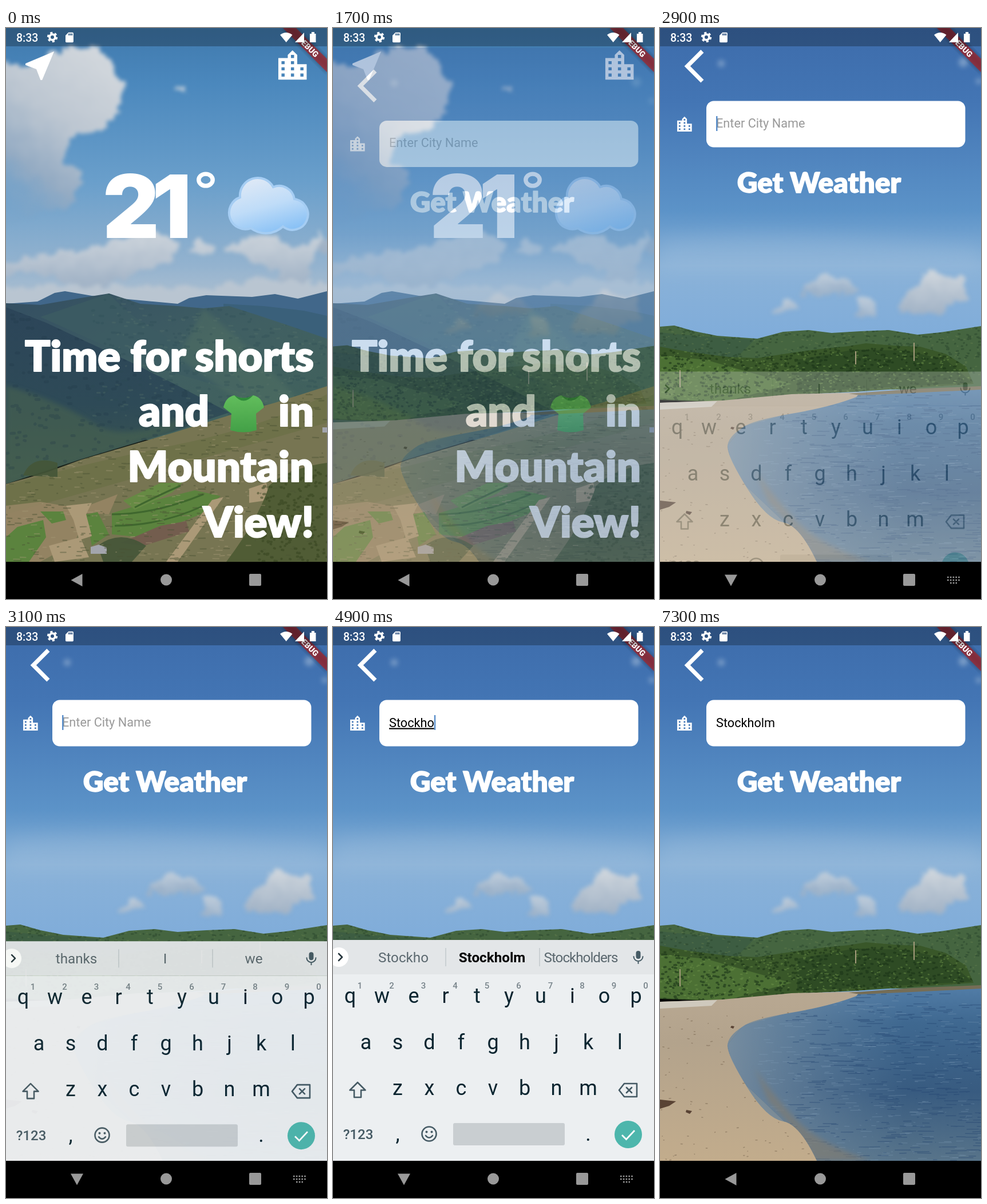
An HTML page that plays this animation: 561 by 998 pixels, repeating every 8 s.

```html
<!DOCTYPE html>
<html lang="en">
<head>
<meta charset="utf-8">
<title>Weather app</title>
<style>
  html, body { margin: 0; width: 100%; height: 100%; overflow: hidden; background: #000; }
  svg { display: block; width: 100vw; height: 100vh; font-family: Roboto, sans-serif; }
  .head { font-family: Lato, sans-serif; font-weight: 900; fill: #fff; stroke: #fff; stroke-width: 1.4; stroke-linejoin: round; }
  .big { font-size: 74px; text-anchor: end; stroke-width: 2; }
  .temp { font: 900 153px Inter, sans-serif; letter-spacing: -13px; fill: #fff; }
  .field { font-size: 21.7px; }
  .key { font-size: 36px; fill: #0b2530; text-anchor: middle; }
  .num { font-size: 15px; font-weight: 500; fill: #77838a; text-anchor: middle; }
  .word { font-size: 24.2px; fill: #5b686f; text-anchor: middle; }
  .word.bold { font-weight: 700; fill: #000; }
  .line { fill: none; stroke: #455a64; stroke-width: 2.6; stroke-linejoin: round; stroke-linecap: round; }
</style>
</head>
<body>
<svg viewBox="0 0 561 998" preserveAspectRatio="none">
  <defs>
    <linearGradient id="skyA" x2="0" y2="1">
      <stop offset="0" stop-color="#3f79ad"/><stop offset=".2" stop-color="#4b88bd"/>
      <stop offset=".55" stop-color="#6a9fcb"/><stop offset=".85" stop-color="#94b3cf"/>
      <stop offset="1" stop-color="#b4c3d1"/>
    </linearGradient>
    <linearGradient id="skyB" x2="0" y2="1">
      <stop offset="0" stop-color="#3d6cab"/><stop offset=".2" stop-color="#4375b4"/>
      <stop offset=".5" stop-color="#5c93c8"/><stop offset=".65" stop-color="#8ab2d8"/>
      <stop offset="1" stop-color="#78a8db"/>
    </linearGradient>
    <linearGradient id="bank" x1=".8" x2=".3" y2="1">
      <stop offset="0" stop-color="#d3d8dd"/><stop offset=".45" stop-color="#bcc6d1"/>
      <stop offset=".75" stop-color="#94abc3"/><stop offset="1" stop-color="#7ba3c7" stop-opacity=".3"/>
    </linearGradient>
    <linearGradient id="heap" x2="0" y2="1">
      <stop offset="0" stop-color="#ced5dc"/><stop offset="1" stop-color="#9fb1c5"/>
    </linearGradient>
    <linearGradient id="range" x2="1" y2="1">
      <stop offset="0" stop-color="#334e62"/><stop offset=".5" stop-color="#405f62"/>
      <stop offset="1" stop-color="#41625a"/>
    </linearGradient>
    <linearGradient id="shade" x2="0" y2="1">
      <stop offset="0" stop-color="#2c4559"/><stop offset=".55" stop-color="#2e4a57"/>
      <stop offset="1" stop-color="#3e584f"/>
    </linearGradient>
    <linearGradient id="sea" x2="0" y2="1">
      <stop offset="0" stop-color="#517ca6"/><stop offset=".2" stop-color="#3f6890"/>
      <stop offset=".6" stop-color="#385b80"/><stop offset="1" stop-color="#58748a"/>
    </linearGradient>
    <linearGradient id="shallow">
      <stop offset="0" stop-color="#8496a4" stop-opacity=".8"/><stop offset=".7" stop-color="#6d8ba6" stop-opacity="0"/>
    </linearGradient>
    <linearGradient id="sand" x2="0" y2="1">
      <stop offset="0" stop-color="#b8a892"/><stop offset=".3" stop-color="#b3a38c"/>
      <stop offset="1" stop-color="#c2ac8c"/>
    </linearGradient>
    <linearGradient id="puff" x1=".3" x2=".7" y2="1">
      <stop offset="0" stop-color="#dfe9f6"/><stop offset=".5" stop-color="#bfdcf8"/>
      <stop offset="1" stop-color="#85bff5"/>
    </linearGradient>
    <linearGradient id="cloth" x2="0" y2="1">
      <stop offset="0" stop-color="#62bd5c"/><stop offset="1" stop-color="#43a047"/>
    </linearGradient>
    <filter id="fluff" x="-20%" y="-20%" width="140%" height="140%" color-interpolation-filters="sRGB">
      <feTurbulence type="fractalNoise" baseFrequency=".045" numOctaves="3" seed="4"/>
      <feDisplacementMap in="SourceGraphic" scale="26" xChannelSelector="R" yChannelSelector="G"/>
      <feGaussianBlur stdDeviation="3.5"/>
    </filter>
    <filter id="soft" x="-20%" y="-30%" width="140%" height="160%"><feGaussianBlur stdDeviation="4"/></filter>
    <filter id="haze" x="-20%" y="-60%" width="140%" height="220%"><feGaussianBlur stdDeviation="16"/></filter>
    <clipPath id="app"><path d="M0 0H561V933H0z"/></clipPath>
    <clipPath id="cRange"><path id="pRange" d="M0 481L60 484 130 472 180 464 235 482 300 486 345 490 390 486 440 502 500 522 561 543V720H0z"/></clipPath>
    <clipPath id="cShade"><path id="pShade" d="M0 488L70 515 140 548 220 585 300 625 390 672 290 706 130 754 0 797z"/></clipPath>
    <clipPath id="cHill"><path id="pHill" d="M0 797L70 777 130 755 290 708 390 677 470 655 561 626V933H0z"/></clipPath>
    <clipPath id="cWood"><path id="pWood" d="M0 557L50 566 120 575 170 577 215 570 280 561 330 556 360 551 420 556 455 557 500 570 535 592 548 622 340 636 230 641 110 654 0 650z"/></clipPath>
    <clipPath id="cRidge"><path id="pRidge" d="M0 522L25 520 60 530 100 538 170 543 215 531 260 528 300 533 350 530 400 528 450 536 490 532 561 521V632H0z"/></clipPath>
    <clipPath id="cSea"><path id="pSea" d="M561 631L440 636 345 641 225 674 145 697 118 730 126 765 152 802 215 862 275 933H561z"/></clipPath>
    <clipPath id="cSand"><path id="pSand" d="M0 655L110 651 230 640 350 637 343 645Q300 662 230 674T145 698Q118 715 118 732T152 804 215 864 274 933H0z"/></clipPath>
    <path id="city" d="M15 11V5l-3-3-3 3v2H3v14h18V11h-6zm-8 8H5v-2h2v2zm0-4H5v-2h2v2zm0-4H5V9h2v2zm6 8h-2v-2h2v2zm0-4h-2v-2h2v2zm0-4h-2V9h2v2zm0-4h-2V5h2v2zm6 12h-2v-2h2v2zm0-4h-2v-2h2v2z" fill="#fff"/>
  </defs>

  <g clip-path="url(#app)">
    <g id="weather">
      <path d="M0 0H561V490H0z" fill="url(#skyA)"/>
      <g filter="url(#fluff)">
        <path d="M-20 62L40 66 90 40 130 30 160 36 185 70 203 100 198 150 165 178 115 190 98 235 140 250 110 315 60 325 -20 345z" fill="url(#bank)"/>
        <g fill="url(#heap)">
          <path d="M-20 415Q60 395 130 385T230 362 290 370 285 405 200 442 90 440 -20 440z"/>
          <path d="M320 392Q340 345 362 392zM385 385Q440 350 480 372T540 365 535 410 470 424z"/>
          <path d="M545 365H590V395H545zM295 103L322 101 312 113z"/>
        </g>
        <path d="M-20 455Q100 448 200 452T330 458L440 438 590 448V500H-20z" fill="#b9c5d1"/>
      </g>
      <path d="M0 482L55 478 85 463 103 460 150 468 300 482 320 472 350 467 430 470 470 465 510 473 561 460V560H0z" fill="#41678a"/>
      <path d="M380 482L450 486 520 494 561 503V570H380z" fill="#3a607a"/>
      <use href="#pRange" fill="url(#range)"/>
      <path d="M180 464Q230 520 320 560T420 640L250 590 60 505z" fill="#3c5c62" opacity=".8"/>
      <path d="M345 490Q320 540 300 575L420 660H520Q440 570 345 490z" fill="#527264" opacity=".45" filter="url(#soft)"/>
      <use href="#pShade" fill="url(#shade)"/>
      <path d="M0 625Q90 650 150 690T330 670L290 705 0 797z" fill="#48644f" opacity=".6" filter="url(#soft)"/>
      <g id="slopes"></g>
      <use href="#pHill" fill="#777552"/>
      <path d="M0 800Q120 765 290 730T561 640V690Q420 730 300 765T0 850z" fill="#6c7047" opacity=".7"/>
      <path d="M0 835L60 828 130 840 195 815 180 850 140 848 120 900 60 933H0z" fill="#9a8867" opacity=".8"/>
      <path d="M20 872L65 860 70 890 40 933H0V890zM60 845L100 845 105 860 80 866zM140 850L160 846 180 885 150 905zM185 848L250 828 330 808 375 818 340 850 300 866 235 890 185 885z" fill="#5b833e"/>
      <path d="M205 826L270 795 308 795 290 812 225 842z" fill="#668a44"/>
      <path d="M105 835L150 830 140 850 150 888 128 895 118 860zM75 905L130 890 145 925 85 933zM425 805L455 795 460 825 425 830zM360 825L380 820 300 933H280z" fill="#ab9977"/>
      <path d="M270 870L315 862 320 880 240 905 200 900z" fill="#735d4e"/>
      <path d="M185 850Q260 850 345 815M190 870Q270 870 345 835M225 838Q270 815 305 800" fill="none" stroke="#3f672e" stroke-width="3"/>
      <path d="M460 800Q490 770 561 760V933H385Q440 860 460 800z" fill="#505c35"/>
      <path d="M30 782Q45 745 90 760V785zM160 905Q200 875 245 905L220 933H170z" fill="#445638" opacity=".9"/>
      <path d="M148 907l14-4 14 5v11h-28zM553 698h12v9h-12z" fill="#a3a5ad"/>
      <g id="fields"></g>

      <path transform="translate(25.7 32.7) scale(2.78)" d="M21 3L3 10.53v.98l6.84 2.65L12.48 21h.98L21 3z" fill="#fff"/>
      <use href="#city" transform="translate(467.7 33.6) scale(2.75 2.7)"/>
      <text class="temp" x="169" y="367">21</text>
      <ellipse cx="349" cy="265.5" rx="12.2" ry="10.4" fill="none" stroke="#fff" stroke-width="7.4"/>
      <path d="M428 350A26 26 0 0 1 409 296A31 31 0 0 1 467 278A27 27 0 0 1 504 299A27 27 0 1 1 484 347A44 44 0 0 1 428 350z" fill="url(#puff)" stroke="#a5cdf3" stroke-width="4"/>
      <g class="head big">
        <text x="538" y="600">Time for shorts</text>
        <text x="355" y="696">and</text>
        <text x="538" y="696">in</text>
        <text x="538" y="793">Mountain</text>
        <text x="538" y="890">View!</text>
      </g>
      <path d="M399 642Q415 652 432 642Q447 645 451 663L437 674 438 703Q415 710 392 703L394 674 380 663Q384 645 399 642z" fill="url(#cloth)"/>
      <path d="M399 642Q415 661 432 642Q415 651 399 642z" fill="#2f8a3a"/>
    </g>

    <g id="search">
      <path d="M0 0H561V640H0z" fill="url(#skyB)"/>
      <path d="M0 372Q200 350 561 385V425H0z" fill="#a5c2de" opacity=".3" filter="url(#haze)"/>
      <g filter="url(#fluff)" fill="url(#heap)">
        <path d="M245 466L265 442 295 430 325 440 352 455 350 466z" opacity=".8"/>
        <path d="M415 500L428 470 450 452 455 425 478 424 500 436 525 434 540 455 535 475 505 485 490 503z"/>
        <path d="M195 496L222 470 248 495zM342 506L348 472 368 470 382 502z" opacity=".8"/>
      </g>
      <g fill="#a3bbd8" opacity=".6" filter="url(#soft)"><circle cx="107" cy="62" r="6"/><circle cx="530" cy="60" r="8"/><circle cx="557" cy="93" r="5"/></g>
      <use href="#pRidge" fill="#456540"/>
      <path d="M0 532L60 538 165 545 120 590H0z" fill="#3b5a43" opacity=".7"/>
      <g id="ridge"></g>
      <use href="#pWood" fill="#395729"/>
      <path d="M0 572L80 580 150 600 230 622 110 654 0 648z" fill="#4c7034"/>
      <path d="M240 580L340 562 430 564 500 580 545 620 240 636z" fill="#2b4723" opacity=".75"/>
      <g id="wood"></g>
      <path d="M342 588V565M444 582V550M35 628V598" stroke="#a49b7b" stroke-width="2"/>
      <path d="M0 660L350 640 561 631V933H0z" fill="#7b8c98"/>
      <use href="#pSea" fill="url(#sea)"/>
      <use href="#pSea" fill="url(#shallow)"/>
      <g id="waves"></g>
      <path d="M165 770Q190 810 235 858T370 933H272Q240 880 190 830z" fill="#7f7c72" opacity=".7" filter="url(#soft)"/>
      <use href="#pSand" fill="url(#sand)"/>
      <path d="M330 639L440 631 561 626V632L440 638 350 642z" fill="#756d56"/>
      <path d="M0 655L100 652 90 662 0 667z" fill="#cfc9bd"/>
      <g id="shore"></g>
      <path d="M0 826l28 3-12 8-16 5zM46 844l10 2-4 5-7-3zM125 697l5 1-2 4-5-2z" fill="#594334"/>

      <path transform="translate(42.6 32) scale(2.9)" d="M11.67 3.87L9.9 2.1 0 12l9.9 9.9 1.77-1.77L3.54 12z" fill="#fff"/>
      <use href="#city" transform="translate(25.8 152) scale(1.42 1.38)"/>
      <rect x="81" y="127.5" width="452.5" height="81" rx="13" fill="#fff"/>
      <text class="field" id="hint" x="98" y="174" fill="#999">Enter City Name</text>
      <text class="field" id="typed" x="98" y="174.5"></text>
      <rect id="caret" y="154" width="2.5" height="26" fill="#5b8fca"/>
      <text class="head" x="278" y="288" font-size="49.5" text-anchor="middle">Get Weather</text>
    </g>

    <g id="keyboard">
      <path d="M0 547H561V607H0z" fill="#e3e6e8"/>
      <path d="M0 607H561V933H0z" fill="#eceff1"/>
      <circle cx="10" cy="577" r="17" fill="#fff"/>
      <path class="line" d="M10 571l6 6-6 6" style="stroke:#26363d"/>
      <path d="M197 561V593M361 561V593" stroke="#c2c9cc" stroke-width="1.5"/>
      <g id="words"></g>
      <rect x="529.5" y="566" width="8" height="14" rx="4" fill="#455a64"/>
      <path class="line" d="M525.5 576a8 8 0 0 0 16 0M533.5 584v4" style="stroke-width:2"/>
      <g id="keys"></g>
      <path class="line" d="M43 796l-13.5 13.5h7.5V822h12V809.5h7.5z"/>
      <path class="line" d="M509 798H531V821H509L500 809.5zM513 805l9 9m0-9l-9 9"/>
      <text x="44" y="895" font-size="24" font-weight="500" text-anchor="middle" fill="#455a64">?123</text>
      <circle class="line" cx="168" cy="886" r="12.5"/>
      <path class="line" d="M162 889q6 7 12 0"/>
      <circle cx="163.5" cy="882.5" r="2" fill="#455a64"/><circle cx="172.5" cy="882.5" r="2" fill="#455a64"/>
      <rect x="210" y="867" width="195" height="39" rx="3" fill="#c9ced1"/>
      <circle id="done" cx="516" cy="887" r="24"/>
      <path d="M505 888l7.5 7.5L527 880" fill="none" stroke="#fff" stroke-width="2.8"/>
    </g>
  </g>

  <g transform="translate(561 0) rotate(45)">
    <rect x="-55" y="38.2" width="110" height="16.4" fill="#000" opacity=".35" filter="url(#soft)"/>
    <rect x="-55" y="38.2" width="110" height="16.4" fill="#b71c1c" opacity=".63"/>
    <text y="51.3" font-size="13.9" font-weight="900" text-anchor="middle" fill="#fff">DEBUG</text>
  </g>
  <path d="M0 0H561V32H0z" opacity=".26"/>
  <g fill="#fff">
    <text x="18" y="23.5" font-size="19.5" font-weight="500">8:33</text>
    <g fill="none" stroke="#fff">
      <circle cx="81" cy="16" r="4.9" stroke-width="3.8"/>
      <circle cx="81" cy="16" r="7.6" stroke-width="3.2" stroke-dasharray="4 3.96"/>
    </g>
    <path transform="translate(100.5 6) scale(.87)" d="M18 2h-8L4.02 8 4 20c0 1.1.9 2 2 2h12c1.1 0 2-.9 2-2V4c0-1.1-.9-2-2-2zm-6 6h-2V4h2v4zm3 0h-2V4h2v4zm3 0h-2V4h2v4z"/>
    <path d="M479 12Q489.500 4 500.500 12L489.700 25zM505 25L521 8V25zM531 10h3V7h5v3h2.500V25H531z"/>
  </g>

  <path d="M0 933H561V998H0z"/>
  <g fill="#999">
    <path id="back" d="M113.5 965L133.5 954V976z"/>
    <circle cx="280" cy="964.5" r="10"/>
    <rect x="425" y="954" width="21" height="21" rx="2"/>
    <path id="ime" d="M502 960H524M502 965H524M507 970H519" stroke="#999" stroke-width="2.6" stroke-dasharray="2.6 2.2"/>
  </g>
  <circle id="tap" r="14" fill="#b4d2e6" fill-opacity=".55" stroke="#8fb4cc" stroke-opacity=".5"/>
</svg>

<script>
const LOOP = 8000, TICK = 100;
const $ = id => document.getElementById(id);
const clamp = v => Math.min(1, Math.max(0, v));
const add = (parent, tag, attrs, text = '') => {
  const el = document.createElementNS('http://www.w3.org/2000/svg', tag);
  for (const k in attrs) el.setAttribute(k, attrs[k]);
  el.textContent = text;
  return parent.appendChild(el);
};

// Photo texture: seeded dabs inside a clipped area
let seed = 7;
const rnd = () => (seed = seed * 16807 % 2147483647) / 2147483647;
function dabs(layer, clip, [x, y, w, h], n, color, size, len, opacity) {
  let d = '';
  for (let i = 0; i < n; i++) {
    d += `M${(x + rnd() * w).toFixed(1)} ${(y + rnd() * h).toFixed(1)}l${(.1 + rnd() * len).toFixed(1)} ${(rnd() - .5).toFixed(1)}`;
  }
  const g = add($(layer), 'g', { 'clip-path': `url(#${clip})` });
  add(g, 'path', { d, fill: 'none', stroke: color, 'stroke-width': size, 'stroke-linecap': 'round', opacity });
}
dabs('slopes', 'cRange', [150, 465, 411, 220], 300, '#2b474f', 4, 8, .25);
dabs('slopes', 'cRange', [150, 465, 411, 220], 200, '#5d7a6c', 3, 6, .25);
dabs('slopes', 'cShade', [0, 490, 390, 300], 300, '#1f3646', 5, 6, .25);
dabs('fields', 'cHill', [0, 640, 561, 293], 450, '#4b5233', 2.2, 12, .45);
dabs('fields', 'cHill', [0, 660, 450, 273], 260, '#a89c78', 1.8, 12, .4);
dabs('fields', 'cHill', [440, 770, 121, 163], 200, '#35431f', 4, 3, .5);
dabs('ridge', 'cRidge', [0, 520, 561, 90], 500, '#2b472d', 3, 3, .5);
dabs('ridge', 'cRidge', [0, 520, 561, 90], 300, '#66814e', 2, 3, .4);
dabs('wood', 'cWood', [0, 555, 561, 98], 700, '#1c3418', 3.5, 3, .6);
dabs('wood', 'cWood', [0, 565, 561, 85], 450, '#6d9149', 2.2, 3, .5);
dabs('waves', 'cSea', [220, 640, 341, 293], 420, '#1f406b', 1.4, 28, .4);
dabs('waves', 'cSea', [160, 650, 401, 283], 360, '#86a3bd', 1, 22, .35);
dabs('shore', 'cSand', [0, 665, 270, 268], 110, '#7d6a54', 1.6, 3, .55);

// Keyboard
[['qwertyuiop', 30, 657], ['asdfghjkl', 57.5, 738], ['zxcvbnm', 113, 818]].forEach(([row, x0, y], r) =>
  [...row].forEach((c, i) => {
    const x = x0 + i * 55.5;
    add($('keys'), 'text', { class: 'key', x, y }, c);
    if (!r) add($('keys'), 'text', { class: 'num', x: x + 17, y: 632 }, (i + 1) % 10);
  }));
add($('keys'), 'text', { class: 'key', x: 113, y: 898 }, ',');
add($('keys'), 'text', { class: 'key', x: 446, y: 898 }, '.');
const words = [123, 278, 433].map(x => add($('words'), 'text', { class: 'word', x, y: 586 }));

// [start, typed text, three suggestions, middle one bold]
const TYPING = [
  [0, '', 'thanks,I,we'],
  [3900, 'S', 'S,So,Still'],
  [4000, 'St', 'St,Still,Start', 1],
  [4100, 'Sto', 'St,Still,Start', 1],
  [4200, 'Sto', 'Sto,Stop,Store', 1],
  [4300, 'Stoc', 'Stoc,Stock,Stocks', 1],
  [4400, 'Stock', 'Stock,Stocks,Stocking'],
  [4700, 'Stockh', 'Stockh,Stockholm,Stocking', 1],
  [4900, 'Stockho', 'Stockho,Stockholm,Stockholders', 1],
  [5400, 'Stockhol', 'Stockho,Stockholm,Stockholders', 1],
  [5500, 'Stockhol', 'Stockhol,Stockholm,Stockholders', 1],
  [5700, 'Stockholm', "Stockholm,Stockholm's,"]
];
const CARET = [[2800, 3300], [3900, 6200], [6700, 7100]];
const TAPS = [[1400, 1600, 500, 64], [2600, 2800, 300, 168], [7000, 7200, 519, 880]];
const within = t => ([from, to]) => t >= from && t < to;

function bezier(x1, y1, x2, y2) {
  const at = (a, b, s) => 3 * (1 - s) * s * ((1 - s) * a + s * b) + s ** 3;
  return x => {
    let lo = 0, hi = 1;
    for (let i = 0; i < 24; i++) {
      const mid = (lo + hi) / 2;
      if (at(x1, x2, mid) < x) lo = mid; else hi = mid;
    }
    return at(y1, y2, hi);
  };
}
const rise = bezier(.4, 0, .2, 1), easeIn = bezier(.42, 0, 1, 1);

function place(el, dy, opacity) {
  el.setAttribute('transform', `translate(0 ${dy.toFixed(2)})`);
  el.setAttribute('opacity', opacity.toFixed(3));
  el.style.display = opacity > 0 ? '' : 'none';
}

function render(t) {
  const page = clamp((t - 1525) / 300);
  place($('search'), 250 * (1 - rise(page)), easeIn(page));
  $('weather').style.display = page < 1 ? '' : 'none';

  const show = clamp((t - 2850) / 300), hide = clamp((t - 7050) / 200);
  place($('keyboard'), 77 * ((1 - show) ** 2 + hide ** 2), (1 - (1 - show) ** 1.7) * (1 - hide));
  const open = show > 0 && hide === 0;
  $('back').setAttribute('transform', open ? 'rotate(-90 124 965)' : '');
  $('ime').style.display = open ? '' : 'none';
  $('done').setAttribute('fill', t >= 7000 ? '#38a59b' : '#4db6ac');
  $('done').setAttribute('r', t >= 7000 ? 25 : 24);

  const [, text, picks, bold] = TYPING.findLast(s => t >= s[0]);
  $('typed').textContent = text;
  $('typed').setAttribute('text-decoration', t < 7100 ? 'underline' : 'none');
  $('hint').style.display = text ? 'none' : '';
  picks.split(',').forEach((w, i) => {
    words[i].textContent = w;
    words[i].setAttribute('class', bold && i === 1 ? 'word bold' : 'word');
    words[i].setAttribute('letter-spacing', w.length > 11 ? -1 : 0);
  });
  const end = text ? $('typed').getComputedTextLength() : 0;
  $('caret').setAttribute('x', 98 + end);
  $('caret').style.display = CARET.some(within(t)) ? '' : 'none';

  const tap = TAPS.find(within(t));
  $('tap').style.display = tap ? '' : 'none';
  if (tap) $('tap').setAttribute('transform', `translate(${tap[2]} ${tap[3]})`);
}

// The screen refreshes ten times a second
const start = performance.now();
let last = -1;
function loop() {
  const t = Math.floor((performance.now() - start) % LOOP / TICK) * TICK;
  if (t !== last) render(last = t);
  requestAnimationFrame(loop);
}
loop();
</script>
</body>
</html>
```
